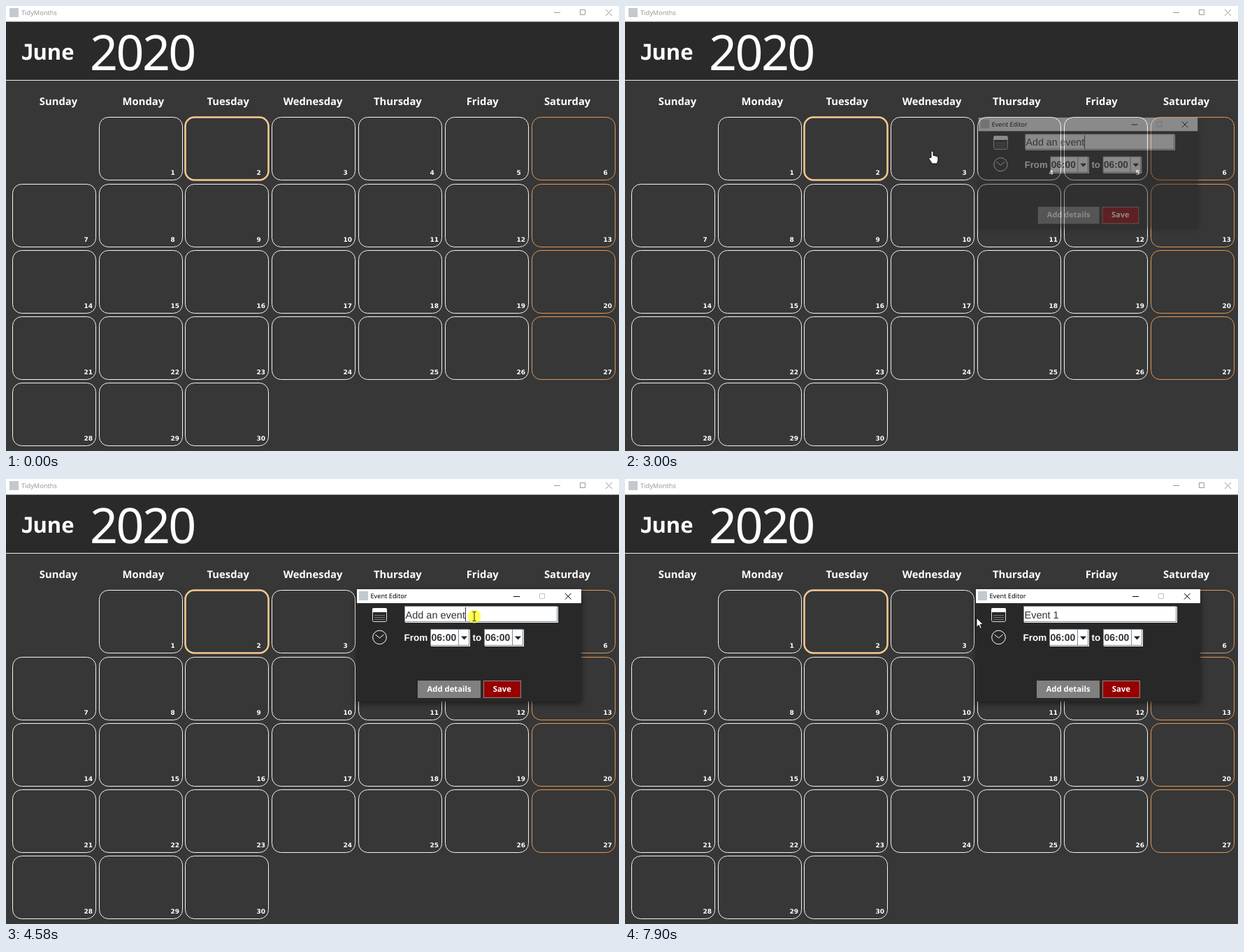
Write an HTML page that moves like this. It is 877 by 638 pixels and loops after 8000 ms.

```html
<!DOCTYPE html>
<html lang="en">
<head>
<meta charset="utf-8">
<title>Calendar</title>
<style>
  html, body { margin: 0; width: 877px; height: 638px; overflow: hidden; background: #373737; }
  svg { display: block; }
  text { white-space: pre; text-rendering: geometricPrecision; }
  .ui { font: 9.2px "Noto Sans", sans-serif; }
  .day { font: bold 14.8px "Noto Sans", sans-serif; fill: #fff; text-anchor: middle; }
  .num { font: bold 9px "DejaVu Sans", sans-serif; fill: #fff; }
  .month { font: bold 31px "Noto Sans", sans-serif; fill: #fff; }
  .year { font: 70px "Noto Sans", sans-serif; letter-spacing: -2.6px; fill: #fff; }
  .label { font: bold 13.5px "Liberation Sans", Arial, sans-serif; fill: #fff; }
  .time { font: bold 14px "Liberation Sans", Arial, sans-serif; fill: #333; }
  .field { font: 14.5px "Liberation Sans", Arial, sans-serif; fill: #333; }
  .button { font: bold 11.3px "Noto Sans", sans-serif; fill: #fff; text-anchor: middle; }
  .line { fill: none; stroke-width: 1; }
  #dialog { transform-origin: 662.5px 238px; filter: drop-shadow(0 3px 4px rgba(0,0,0,.5)); }
</style>
</head>
<body>
<svg width="877" height="638" viewBox="0 0 877 638">
  <rect width="877" height="638" fill="#373737"/>
  <rect width="877" height="23" fill="#fff"/>
  <rect y="22.5" width="877" height="83.500" fill="#2a2a2a"/>
  <rect y="106" width="877" height="1" fill="#eee"/>
  <rect x="5" y="3" width="13" height="13" fill="#c3c9ce"/>
  <g id="titlebar">
    <text class="ui" x="22" y="13">TidyMonths</text>
    <path class="line" stroke="currentColor" d="M784 9.5h9M821.5 5.5h7v7h-7zM858 5l9 9m0-9l-9 9"/>
  </g>
  <text class="month" x="21.5" y="76.5" style="font-family:'DejaVu Sans Mono',monospace">J</text>
  <text class="month" x="38.5" y="76.5">une</text>
  <text class="year" x="120" y="92">2020</text>
  <g id="month"></g>

  <g id="dialog">
    <rect x="502" y="158" width="321" height="161" fill="#282828"/>
    <rect x="502" y="158" width="321" height="20" fill="#fff"/>
    <rect x="505" y="161" width="13" height="13" fill="#c3c9ce"/>
    <text class="ui" x="521.5" y="171">Event Editor</text>
    <path class="line" stroke="#000" d="M726 168.5h9M800 164l8.500 8.500m0-8.500l-8.500 8.500"/>
    <path class="line" stroke="#c4c4c4" d="M763.500 164.500h7v7h-7z"/>

    <rect x="524.5" y="185.500" width="20" height="19" rx="2" class="line" stroke="#ddd"/>
    <path d="M524 191v-4q0-2 2-2h17q2 0 2 2v4z" fill="#fff"/>
    <path class="line" stroke="#777" d="M527 195.500h15M527 198.500h15M527 201.500h15"/>
    <circle cx="534.500" cy="227" r="9.800" class="line" stroke="#fff"/>
    <path class="line" stroke="#fff" d="M528.500 223l6 5 6-5"/>

    <rect x="571" y="183" width="219" height="23" fill="#fff"/>
    <rect x="570.500" y="182.500" width="218" height="22" fill="#fff" stroke="#7a8a99"/>
    <rect id="selection" y="184" height="20" fill="#b8cfe5"/>
    <text id="entry" class="field" x="571.500" y="199.500"></text>
    <rect id="caret" y="184" width="1" height="20" fill="#333"/>

    <text class="label" x="569.500" y="232">From</text>
    <text class="label" x="667.500" y="232">to</text>
    <g id="combo">
      <rect x="608" y="216" width="56" height="24" fill="#fff"/>
      <rect x="607.500" y="215.500" width="55" height="23" fill="#fff" stroke="#7a8a99"/>
      <path class="line" stroke="#7a8a99" d="M647.500 216v22"/>
      <path d="M651 225.500h9l-4.500 5z" fill="#222"/>
      <text class="time" x="608.500" y="232">06:00</text>
    </g>
    <use href="#combo" x="77"/>

    <rect x="589" y="289" width="90" height="25" fill="#808080"/>
    <text class="button" x="634" y="304.500">Add details</text>
    <rect x="683.500" y="289.500" width="53" height="24" fill="#960000" stroke="#a08080"/>
    <text class="button" x="709.800" y="304.500">Save</text>
  </g>

  <g id="pointer">
    <circle id="press" r="9.500" fill="#ffff28" fill-opacity=".8"/>
    <path id="hand" fill="#fff" stroke="#000" stroke-width=".9"
      d="M-1.500 9V1q0-1.500 1.500-1.500T1.500 1v4.700l4.700 1q2.200.5 2.200 2.500v3.500l-1.500 4.800h-7L-4.400 11q-1-2 .6-2.300z"/>
    <path id="arrow" fill="#fff" stroke="#000" stroke-width=".9"
      d="M0 0v13.500l3.100-3 2.200 5 2.100-.9-2.200-4.900h4.300z"/>
    <path id="beam" class="line" stroke="#222"
      d="M-2.500-6.500h2l.5.500.500-.500h2M0-6V6M-2.500 6.500h2L0 6l.500.500h2"/>
  </g>
</svg>
<script>
const LOOP = 8000;
const $ = id => document.getElementById(id);
const show = (el, on) => { el.style.display = on ? '' : 'none'; };
const within = (t, from, to) => t >= from && t < to;

// Calendar grid
const PITCH_X = 123.8, PITCH_Y = 95.25, LEFT = 8.75, TOP = 159.45;
const cellX = col => Math.round(LEFT + PITCH_X * col);
const cellY = row => Math.round(TOP + PITCH_Y * row);
const weekdays = ['Sunday', 'Monday', 'Tuesday', 'Wednesday', 'Thursday', 'Friday', 'Saturday'];
let grid = weekdays.map((name, i) =>
  `<text class="day" x="${75 + 121.35 * i}" y="141.500">${name}</text>`).join('');
for (let day = 1; day <= 30; day++) {
  const col = day % 7, x = cellX(col), y = cellY(Math.floor(day / 7));
  const today = day === 2;
  const color = today ? '#f8ca92' : col === 6 ? '#e09a58' : '#f4f4f4';
  grid += `<rect x="${x + .5}" y="${y + .5}" width="119" height="90" rx="13" fill="none"
    stroke="${color}" stroke-width="${today ? 2.5 : 1}"/>
    <text class="num" x="${x + 102.5}" y="${y + 83}">${day}</text>`;
}
$('month').innerHTML = grid;

function overCell(x, y) {
  const col = Math.floor((x - LEFT) / PITCH_X), row = Math.floor((y - TOP) / PITCH_Y);
  const day = row * 7 + col;
  return day > 0 && day <= 30 && row >= 0 && x < cellX(col) + 120 && y < cellY(row) + 91;
}

// Pointer path: time, x, y
const path = [
  [1210, 776, 628], [1670, 511, 456], [1980, 428, 328], [2360, 409, 237.5], [2770, 439.5, 208.5],
  [3640, 439.5, 208.5], [4120, 670, 197], [4610, 670, 197], [4700, 506, 199], [4860, 503, 199]
];
function pointerAt(t) {
  const i = path.findIndex(p => p[0] > t);
  if (i < 0) return path[path.length - 1].slice(1);
  const [t0, x0, y0] = path[Math.max(0, i - 1)], [t1, x1, y1] = path[i];
  const k = t1 > t0 ? Math.max(0, (t - t0) / (t1 - t0)) : 0;
  return [x0 + (x1 - x0) * k, y0 + (y1 - y0) * k];
}

const PROMPT = 'Add an event', ENTRY = 'Event 1';
const keyTimes = [6020, 6380, 6460, 6610, 6660, 7250, 7390];
const caretOff = [[3460, 3960], [5180, 5690], [7160, 7250], [7900, LOOP]];
const entry = $('entry');
const caretX = n => Math.round(572 + (n ? entry.getSubStringLength(0, n) : 0));

function drawPointer(t, x, y) {
  const dragging = within(t, 4610, 4860);
  const inField = dragging || t > 3000 && within(x, 570, 789) && within(y, 182, 205);
  const onDialog = t > 2950 && within(x, 502, 823) && within(y, 157, 319);
  const onCell = !inField && !onDialog && overCell(x, y);
  show($('pointer'), t >= 1210);
  show($('beam'), inField);
  show($('hand'), onCell);
  show($('arrow'), !inField && !onCell);
  show($('press'), within(t, 2680, 2760) || within(t, 4380, 4860));
  $('pointer').setAttribute('transform', `translate(${x} ${y})`);
}

function drawEntry(t, x) {
  const typed = keyTimes.filter(k => k <= t).length;
  const value = typed ? ENTRY.slice(0, typed) : PROMPT;
  if (entry.textContent !== value) entry.textContent = value;
  let caret = value.length;
  if (!typed && t >= 4610) while (caret && caretX(caret) > x) caret--;
  const left = caretX(caret);
  $('selection').setAttribute('x', left);
  $('selection').setAttribute('width', caretX(value.length) - left);
  $('caret').setAttribute('x', left);
  show($('caret'), !caretOff.some(([from, to]) => within(t, from, to)));
}

function draw(t) {
  const [x, y] = pointerAt(t);
  const titleColor = within(t, 2700, 2950) ? '#000' : '#999';
  $('titlebar').style.color = $('titlebar').style.fill = titleColor;

  const p = Math.min(1, Math.max(0, (t - 2930) / 300));
  const ease = 1 - (1 - p) ** 2;
  show($('dialog'), t >= 2950);
  $('dialog').style.opacity = ease;
  $('dialog').style.transform = p < 1 ? `scale(${.96 + .04 * ease})` : 'none';
  if (t >= 2950) drawEntry(t, x);
  drawPointer(t, x, y);
}

function tick() {
  draw(performance.now() % LOOP);
  requestAnimationFrame(tick);
}
tick();
</script>
</body>
</html>
```
